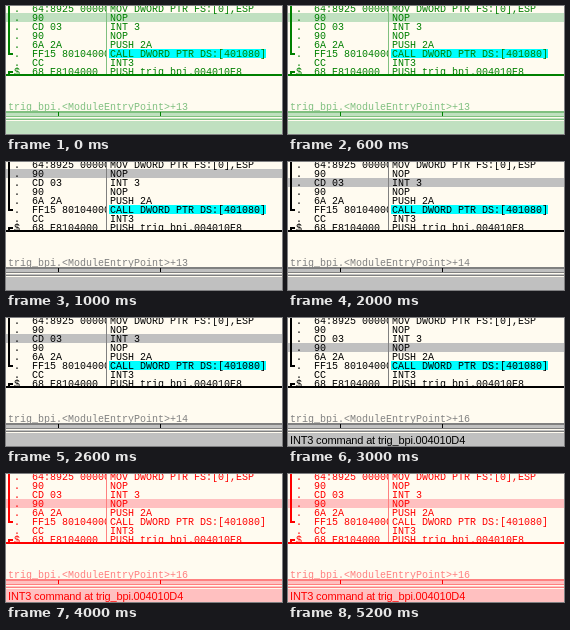
Write an HTML page that moves like this. It is 276 px wide and 128 px high and loops after 6 s.

```html
<!DOCTYPE html>
<html lang="en">
<head>
<meta charset="utf-8">
<title>Debugger stepping</title>
<style>
html, body { margin: 0; width: 100%; height: 100%; overflow: hidden; }
svg {
  --ink: #000; --paper: #fffbf0; --face: #c0c0c0; --dim: #808080; --call: #00ffff;
  display: block; width: 276px; height: 128px; background: var(--paper);
}
svg.green { --ink: #008000; --face: #c0e0c0; --dim: #80c080; }
svg.red { --ink: #ff0000; --face: #ffc0c0; --dim: #ff8080; --call: var(--paper); }
text { font: 10px "Liberation Mono", monospace; fill: var(--ink); white-space: pre; }
#message { font: 11px "Liberation Sans", sans-serif; letter-spacing: -.16px; }
.ink { fill: var(--ink); }
.dim { fill: var(--dim); }
.paper { fill: var(--paper); }
.face { fill: var(--face); }
.bracket { fill: none; stroke: var(--ink); stroke-width: 2; }
</style>
</head>
<body>
<svg id="stage" viewBox="0 0 276 128" shape-rendering="crispEdges">
  <clipPath id="codeClip"><rect width="100" height="68"/></clipPath>
  <rect id="selection" class="face" width="276" height="9"/>
  <rect x="103" y="43" width="157" height="9" fill="var(--call)"/>
  <g id="bytes" clip-path="url(#codeClip)"></g>
  <g id="commands"></g>
  <path class="bracket" d="M3 0V48H7M3 69V66H7"/>
  <rect class="dim" x="100" width="1" height="68"/>
  <rect class="paper" y="68" width="276" height="37"/>
  <rect class="ink" y="68" width="276" height="2"/>
  <text id="info" class="dim" x="2" y="103.5"></text>
  <rect class="face" y="105" width="276" height="23"/>
  <path class="dim" d="M0 105H276V107H0ZM0 110H276V111H0ZM0 113H276V114H0Z"/>
  <path class="paper" d="M0 111H276V112H0ZM0 114H276V115H0Z"/>
  <path class="ink" d="M52 106H53V110H52ZM154 106H155V110H154Z"/>
  <text id="message" x="2" y="126"></text>
</svg>
<script>
const $ = id => document.getElementById(id);
const ROW = 9, TOP = -2;

const code = [
  [".", "64:8925 00000000", "MOV DWORD PTR FS:[0],ESP"],
  [".", "90", "NOP"],
  [".", "CD 03", "INT 3"],
  [".", "90", "NOP"],
  [".", "6A 2A", "PUSH 2A"],
  [".", "FF15 80104000", "CALL DWORD PTR DS:[401080]"],
  [".", "CC", "INT3"],
  ["$", "68 E8104000", "PUSH trig_bpi.004010E8"]
];

// One state per second; the last one lasts two.
const states = [
  { theme: "green", row: 1, offset: 13 },
  { theme: "", row: 1, offset: 13 },
  { theme: "", row: 2, offset: 14 },
  { theme: "", row: 3, offset: 16, stopped: true },
  { theme: "red", row: 3, offset: 16, stopped: true }
];

function addText(parent, x, y, content) {
  const el = document.createElementNS("http://www.w3.org/2000/svg", "text");
  el.setAttribute("x", x);
  el.setAttribute("y", y);
  el.textContent = content;
  parent.append(el);
}

code.forEach(([mark, bytes, command], i) => {
  const y = TOP + i * ROW + 8;
  addText($("bytes"), 8, y, mark);
  addText($("bytes"), 26, y, bytes);
  addText($("commands"), 104, y, command);
});

let shown;
function draw(now) {
  const state = states[Math.min(4, Math.floor(now % 6000 / 1000))];
  if (state !== shown) {
    shown = state;
    $("stage").setAttribute("class", state.theme);
    $("selection").setAttribute("y", TOP + state.row * ROW);
    $("info").textContent = `trig_bpi.<ModuleEntryPoint>+${state.offset}`;
    $("message").textContent = state.stopped ? "INT3 command at trig_bpi.004010D4" : "";
  }
  requestAnimationFrame(draw);
}
draw(performance.now());
</script>
</body>
</html>
```
